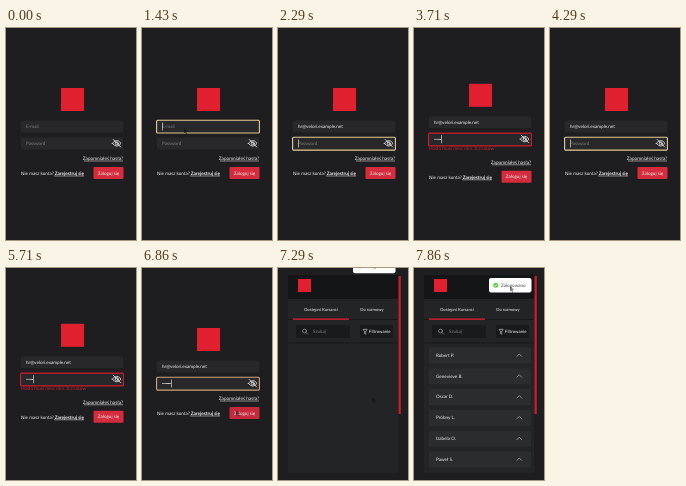
Animation, 130 px wide and 212 px high, one loop 8 s. Source, as an HTML page:

```html
<!DOCTYPE html>
<html lang="pl">
<head>
<meta charset="utf-8">
<title>Logowanie</title>
<style>
  html, body { margin: 0; width: 100%; height: 100%; overflow: hidden; background: #1e1d20; }
  svg { display: block; width: 100vw; height: 100vh; }
  text { font: 4.6px Lato, "Open Sans", sans-serif; fill: #f2f2f2; text-rendering: geometricPrecision; }
  .hint { fill: #7f8081; }
  .bold { font-weight: 700; }
  .error { fill: #cf2433; }
  .field { fill: #28272a; }
  .line { fill: none; stroke: #ececec; stroke-width: .8; stroke-linecap: round; stroke-linejoin: round; }
</style>
</head>
<body>
<svg viewBox="0 0 130 212" preserveAspectRatio="none">
  <rect width="130" height="212" fill="#1e1d20"/>

  <g id="login">
    <g id="upper">
      <rect x="55" y="60" width="23" height="23" fill="#e0202f"/>
      <rect class="field" x="15" y="92.5" width="102" height="12" rx="1"/>
      <rect class="field" x="15" y="109.5" width="102" height="12" rx="1"/>
      <text id="email" x="20" y="100"></text>
      <text id="passHint" class="hint" x="20" y="117">Password</text>
      <g id="dots" fill="#f2f2f2"></g>
      <g class="line">
        <path d="M106.4 115.3Q110.7 109.6 115 115.3Q110.7 121 106.4 115.3Z"/>
        <circle cx="110.7" cy="115.3" r="1.5"/>
        <path d="M107.2 111.4L114.6 119"/>
      </g>
      <rect id="ring" x="14.6" width="102.8" height="12.8" rx="1" fill="none" stroke-width="1.1"/>
      <rect id="caret" width=".6" height="8" fill="#f2f2f2"/>
      <text id="error" class="error" x="15" y="126.6" style="font-size:4.75px">Hasło musi mieć min. 8 znaków</text>
    </g>
    <g id="lower">
      <text x="117" y="131.8" text-anchor="end" style="font-size:4.7px">Zapomniałeś hasła?</text>
      <path d="M78 133H117M48 148H78" stroke="#f2f2f2" stroke-width=".5"/>
      <text x="15" y="147">Nie masz konta?</text>
      <text x="78" y="147" class="bold" text-anchor="end" style="font-size:4.7px">Zarejestruj się</text>
      <rect id="button" x="87.5" y="139" width="30" height="12" rx="1"/>
      <text x="102.5" y="146.7" text-anchor="middle">Zaloguj się</text>
    </g>
  </g>

  <g id="list">
    <rect x="10" y="7" width="111" height="24" fill="#141516"/>
    <rect x="20" y="11" width="13" height="13" fill="#e0202f"/>
    <rect x="10" y="31" width="110" height="174" fill="#222425"/>
    <text x="43" y="42.5" text-anchor="middle" style="font-size:4.2px">Dostępni Kursanci</text>
    <text x="94" y="42.5" text-anchor="middle" style="font-size:4.2px">Do rozmowy</text>
    <path d="M10 51.5H120M10 75H120" stroke="#18191a" stroke-width="1"/>
    <rect x="15" y="50.5" width="56" height="1.3" fill="#e0202f"/>
    <rect x="18" y="57" width="54" height="13" rx="1" fill="#191a1b"/>
    <g class="line" style="stroke:#8b8c8d">
      <circle cx="26.5" cy="63" r="1.9"/>
      <path d="M28 64.5L29.7 66.2"/>
    </g>
    <text class="hint" x="35" y="65">Szukaj</text>
    <rect x="82" y="57" width="33" height="13" rx="1" fill="#191a1b"/>
    <path d="M85 61.3H89.2L87.7 63.5V66.2L86.5 65.5V63.5Z" fill="none" stroke="#d0d0d0" stroke-width=".6"/>
    <text x="91" y="65" style="font-size:4.4px">Filtrowanie</text>
    <g id="rows"></g>
    <rect x="120.5" y="8" width="2.3" height="138" rx=".6" fill="#c91f2d"/>
    <g id="toast">
      <rect x="75" y="10" width="42.5" height="14.5" rx="2" fill="#fff"/>
      <circle cx="81.8" cy="17.2" r="2.5" fill="#5fcf48"/>
      <path d="M80.6 17.3L81.5 18.2L83 16.3" fill="none" stroke="#fff" stroke-width=".7"/>
      <text x="87" y="18.8" style="fill:#444">Zalogowano</text>
    </g>
  </g>

  <path id="pointer" d="M0 0V5.6L1.3 4.4L2.3 6.5L3.2 6.1L2.3 4.1H4Z" fill="#0c0c0d" fill-opacity=".55"/>
</svg>

<script>
const LOOP = 8000, STEP = 1000 / 7;
const EMAIL = 'hr@velori.example.net';
const PEOPLE = ['Robert P.', 'Genevieve B.', 'Oscar D.', 'Próbny L.', 'Izabela O.', 'Paweł S.'];
const PALE = '#e6cd94', TAN = '#cfa580', ORANGE = '#dc7a26', RED = '#cc1f2e';

const $ = id => document.getElementById(id);
const set = (id, attrs) => {
  for (const key in attrs) $(id).setAttribute(key, attrs[key]);
};
const show = (id, on) => set(id, { visibility: on ? 'visible' : 'hidden' });
const shift = (id, x, y) => set(id, { transform: `translate(${x} ${y})` });
const clamp = v => Math.min(1, Math.max(0, v));
const ease = v => v * v * (3 - 2 * v);
// Last value in a list of [start, value] pairs that has begun.
const at = (track, k) => track.reduce((now, [start, value]) => k >= start ? value : now, track[0][1]);

$('rows').innerHTML = PEOPLE.map((name, i) => `
  <g transform="translate(0 ${i * 20.8})">
    <rect x="15" y="79.5" width="102" height="16" rx="1" fill="#2a2c2d"/>
    <text x="22" y="88.8">${name}</text>
    <path class="line" style="stroke:#a5a6a7" d="M102.8 88.5L105.3 86L107.8 88.5"/>
  </g>`).join('');

$('dots').innerHTML = Array.from({ length: 8 }, (_, i) =>
  `<circle cx="${20.8 + i * 1.15}" cy="115.5" r=".55"/>`).join('');

// All tracks count in seventh-of-a-second steps.
const typed = [[0, 0], [18, 1], [21, 2], [22, 3], [23, 4], [25, 5], [26, 6],
  [29, 0], [32, 1], [33, 2], [34, 3], [36, 4], [37, 5], [40, 6], [41, 7], [42, 8]];
const focus = [[0, ''], [9, 'email'], [15, 'pass'], [50, '']];
const ringColor = [[0, PALE], [19, RED], [29, PALE], [33, ORANGE], [34, RED], [43, TAN]];
const raised = [[0, 0], [19, 1], [29, 0], [33, 1], [43, 0]];
const failed = [[0, false], [19, true], [29, false], [34, true], [43, false]];
// start, end, from x, from y, to x, to y
const moves = [[6, 9, 104, 146, 42, 100], [44, 48, 128, 150, 94, 142], [50, 55, 94, 142, 96, 18]];

function drawPointer(k) {
  const visible = k >= 6 && k < 11 || k >= 44;
  show('pointer', visible);
  if (!visible) return;
  const [a, b, x0, y0, x1, y1] = moves.filter(m => k >= m[0]).pop();
  const p = ease(clamp((k - a) / (b - a)));
  shift('pointer', x0 + (x1 - x0) * p, y0 + (y1 - y0) * p);
}

function drawLogin(k) {
  const count = at(typed, k), where = at(focus, k), inPass = where === 'pass';
  const lift = at(raised, k);
  shift('upper', 0, -4.2 * lift);
  shift('lower', 0, 3.8 * lift);

  const filled = k >= 13;
  $('email').textContent = filled ? EMAIL : 'E-mail';
  $('email').setAttribute('class', filled ? '' : 'hint');
  show('passHint', !count);
  [...$('dots').children].forEach((dot, i) =>
    dot.setAttribute('visibility', i < count ? 'inherit' : 'hidden'));

  show('ring', where);
  show('caret', where);
  show('error', at(failed, k));
  set('ring', { y: inPass ? 109.3 : 92.2, stroke: at(ringColor, k) });
  const textWidth = inPass ? count * 1.15 : filled ? $('email').getComputedTextLength() : 0;
  set('caret', { x: 20.1 + textWidth, y: inPass ? 111.5 : 94.5 });
  set('button', { fill: k >= 47 ? '#c42a3c' : '#d42c3d' });
}

function render(ms) {
  const k = Math.floor((ms % LOOP + 5) / STEP);
  const inside = k >= 51;
  set('login', { display: inside ? 'none' : 'inline' });
  set('list', { display: inside ? 'inline' : 'none' });
  if (inside) {
    show('rows', k >= 52);
    shift('toast', 0, -26 * (1 - ease(clamp((k - 50) / 3))));
  } else {
    drawLogin(k);
  }
  drawPointer(k);
}

const start = performance.now();
function tick() {
  render(performance.now() - start);
  requestAnimationFrame(tick);
}
tick();
</script>
</body>
</html>
```
